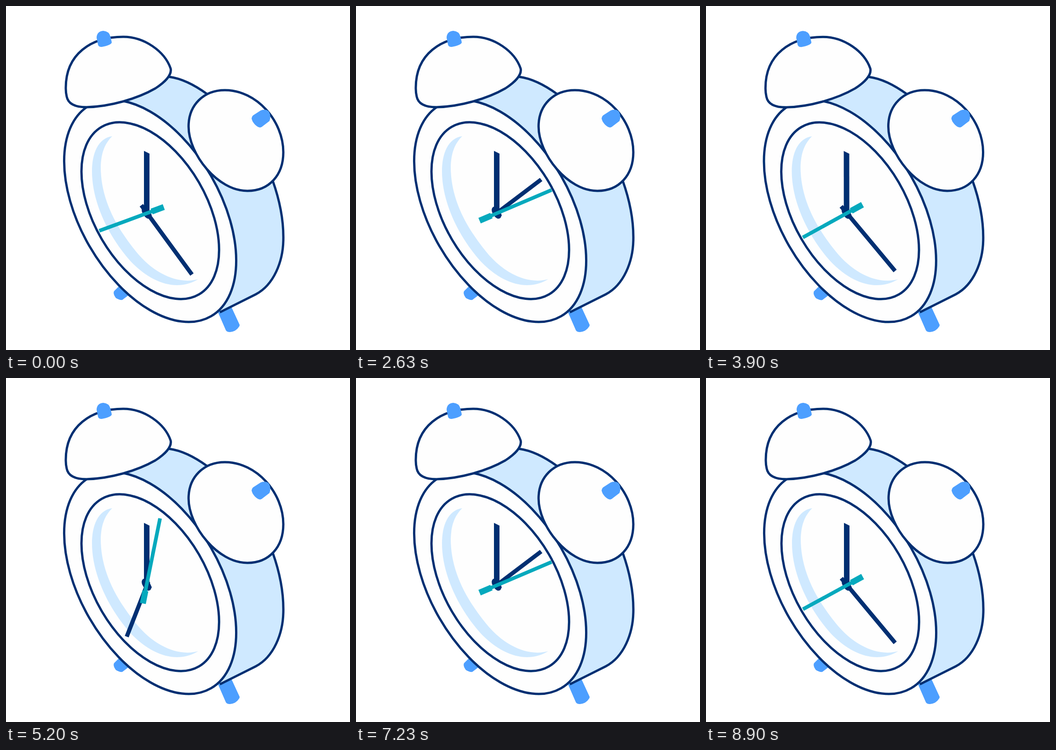
An HTML page for the animation above (9.23 s loop, 748x748 px).

```html
<!DOCTYPE html>
<html lang="en">
<head>
<meta charset="utf-8">
<title>Alarm clock</title>
<style>
  html, body { margin: 0; width: 100%; height: 100%; overflow: hidden; background: #fff; }
  svg { display: block; width: 100%; height: 100%; }
  .line { fill: #fefefe; stroke: #002f72; stroke-width: 5; stroke-linejoin: round; vector-effect: non-scaling-stroke; }
  .line.side { fill: #cfe9ff; }
  .pale { fill: #cfe9ff; }
  .knob { fill: #4d9fff; }
  .navy { fill: #002f72; }
  .teal { fill: #05a9bd; }
</style>
</head>
<body>
<svg viewBox="0 0 748 748">
  <g id="clock">
    <path class="knob" d="M249 606L235 620Q232 626 239 635Q247 640 253 639L274 623Z"/>
    <path class="knob" d="M461 666L478 705Q480 709 487 709Q500 708 507 697Q509 694 507 691L489 652Z"/>
    <path class="line side" d="M250 205L340 145L355 154C385 158 412 173 438 192C510 245 558 315 580 380C596 425 604 470 603 510C602 555 583 606 543 627L465 666"/>
    <circle class="line" r="216" transform="matrix(.866 .5 0 1 313.5 445.5)"/>
    <circle class="line" r="174" transform="matrix(.86 .49 0 .99 313.7 445)"/>
    <path class="pale" d="M231 283C200 288 187 320 187 360C187 425 222 500 270 554C320 607 375 620 418 594C375 606 322 583 282 533C235 475 206 415 206 350C207 320 214 300 231 283Z"/>
    <path class="line" d="M130 180C129 104 186 67 255 67C300 67 345 98 358 136C361 150 345 166 325 179C285 202 225 219 175 220C150 220 135 212 132 197Q130 188 130 180Z"/>
    <path class="line" d="M397 262C397 215 430 183 476 183C545 183 603 250 603 318C603 368 572 402 525 402C460 402 397 322 397 262Z"/>
    <path class="knob" d="M197 69C197 59 204 54 212 54Q224 55 227 66L230 79Q229 85 208 89Q201 89 200 84Z"/>
    <path class="knob" d="M537 238L554 227Q566 223 572 230Q577 239 573 250L556 263Q551 266 545 261Q536 254 534 245Q534 241 537 238Z"/>
    <path class="navy" d="M300 315L312 321V452L300 446Z"/>
    <path class="navy" id="minute"/>
    <path class="navy" d="M295 443Q296 436 302 436L312 444L317 455L314 461Q308 465 302 458Q295 450 295 443Z"/>
    <path class="teal" id="second"/>
  </g>
</svg>
<script>
const LOOP = 9230, CYCLE = 4600, RUN_END = 3510, REST = 4300;
const [clock, minute, second] = ["clock", "minute", "second"].map(id => document.getElementById(id));

const sin = deg => Math.sin(deg * Math.PI / 180);
const cos = deg => Math.cos(deg * Math.PI / 180);

// Length on screen of a unit vector lying in the tilted dial, by its screen angle from twelve.
function foreshorten(angle) {
  const x = sin(angle) / .866;
  return 1 / Math.hypot(x, cos(angle) + x / 2);
}

// Hand lengths: the dial's foreshortening, with a lean towards the upper right.
const minuteReach = a => foreshorten(a) * (152 + 9 * cos(a - 20) + 10 * cos(2 * (a - 55)));
const secondReach = a => foreshorten(a) * (160 + 15 * cos(a - 60) + 8 * cos(2 * (a - 70)));

const bar = (width, top, bottom) => `M${-width / 2} ${top}h${width}V${bottom}h${-width}Z`;

function place(hand, x, y, angle, shape) {
  hand.setAttribute("d", shape);
  hand.setAttribute("transform", `translate(${x} ${y}) rotate(${angle})`);
}

// Damped ringing, in degrees, after the hands have stopped.
function shake(t) {
  if (t < RUN_END || t >= REST) return 0;
  const s = t - RUN_END;
  return 4.5 * Math.exp(-s / 139) * sin(360 * s / 253);
}

function draw(now) {
  const loopTime = now % LOOP;
  const raw = loopTime < CYCLE ? loopTime : loopTime - CYCLE;
  // The picture steps 20 times a second, held for 30 and 70 ms in turn.
  const t = Math.floor(raw / 100) * 100 + (raw % 100 >= 30 ? 50 : 0);
  const run = Math.min(t / RUN_END, 1);

  const steady = 144.2 + 355.7 * run;
  const minuteAngle = steady - 4.5 * sin(2 * (steady - 142));
  const reach = minuteReach(minuteAngle);
  place(minute, 306.5, 450, minuteAngle, bar(9, -reach, Math.max(8, reach * .8 - 112)));

  const secondAngle = 249.8 + 711.5 * run;
  place(second, 305.5, 451, secondAngle, bar(8, -secondReach(secondAngle), 20) + bar(13, 12, 40));

  clock.setAttribute("transform", `rotate(${shake(t)} 480 700)`);
}

const start = performance.now();
function tick() {
  draw(performance.now() - start);
  requestAnimationFrame(tick);
}
tick();
</script>
</body>
</html>
```
